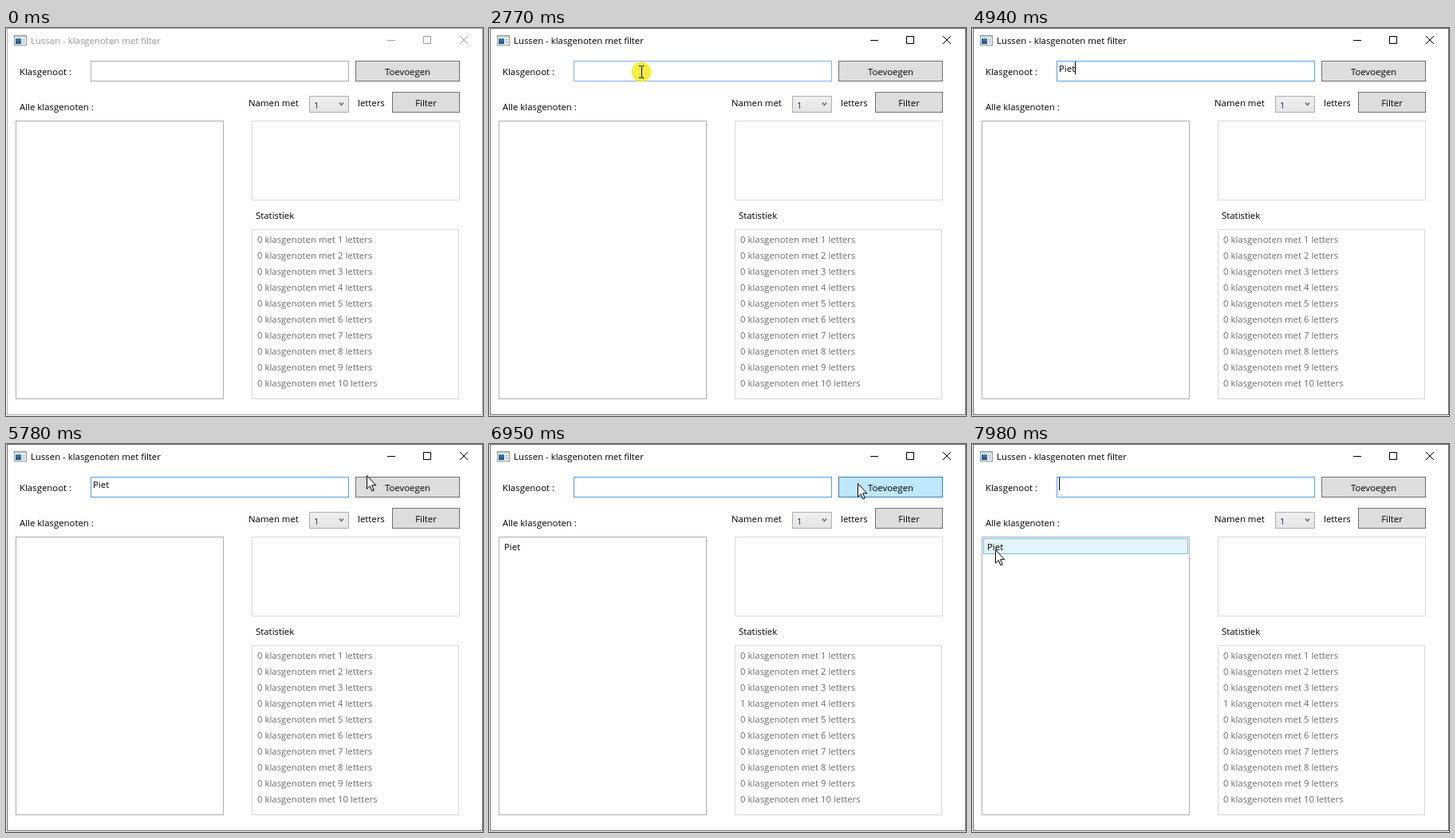
Write an HTML page that moves like this. It is 598 px wide and 486 px high and loops after 8000 ms.

```html
<!DOCTYPE html>
<html lang="nl">
<head>
<meta charset="utf-8">
<title>Lussen - klasgenoten met filter</title>
<style>
  html, body { margin: 0; width: 100%; height: 100%; overflow: hidden; background: #fff; }
  svg { display: block; width: 598px; height: 486px; }
  text { font: 11.4px "Open Sans", "Noto Sans", sans-serif; fill: #000; }
  .grey { fill: #6d6d6d; }
  .mid { text-anchor: middle; }
  rect { shape-rendering: crispEdges; }
</style>
</head>
<body>
<svg id="stage" viewBox="0 0 598 486" xmlns="http://www.w3.org/2000/svg">
  <defs>
    <linearGradient id="face" x2="0" y2="1">
      <stop stop-color="#f0f0f0"/><stop offset="1" stop-color="#e5e5e5"/>
    </linearGradient>
    <linearGradient id="pane" x2="0" y2="1">
      <stop stop-color="#3f7fae"/><stop offset="1" stop-color="#1f4f80"/>
    </linearGradient>
  </defs>
</svg>
<script>
const LOOP = 8000;
const NAME = 'Piet';
const stage = document.getElementById('stage');

function add(tag, attrs, content = '', parent = stage) {
  const el = document.createElementNS('http://www.w3.org/2000/svg', tag);
  for (const key in attrs) el.setAttribute(key, attrs[key]);
  el.textContent = content;
  return parent.appendChild(el);
}

// Outlined box given by its outer pixel edges
const box = (x0, y0, x1, y1, stroke, fill = '#fff') =>
  add('rect', { x: x0 + .5, y: y0 + .5, width: x1 - x0 - 1, height: y1 - y0 - 1, stroke, fill });
const label = (x, y, content, cls = '') => add('text', { x, y, class: cls }, content);
const show = (el, on) => el.setAttribute('visibility', on ? 'visible' : 'hidden');
const paint = (el, stroke, fill) => {
  el.setAttribute('stroke', stroke);
  el.setAttribute('fill', fill);
};
const place = (el, x, y) => el.setAttribute('transform', `translate(${x} ${y})`);

// Window frame and title bar
const frame = box(1, 0, 598, 485, '#aaa');
box(10, 9, 26, 22, '#8c959c', '#f4f6f8');
add('rect', { x: 11, y: 10, width: 14, height: 2, fill: '#c9d2d9' });
add('rect', { x: 12, y: 13, width: 7, height: 7, fill: 'url(#pane)' });
add('path', { d: 'M20 14.5h4M20 16.5h4M20 18.5h4', stroke: '#a9b6c0' });
const title = label(31, 20, 'Lussen - klasgenoten met filter');
const controls = add('path', {
  d: 'M478 15.5h10M523.5 10.5h9v9h-9zM569 10l10 10M579 10l-10 10', fill: 'none'
});

// Form
label(17, 59, 'Klasgenoot :');
const field = box(106, 41, 430, 67, '#abadb3');
const typed = label(109, 55, NAME);
const caret = add('rect', { y: 42, width: 1, height: 16, fill: '#000' });
const addButton = box(438, 41, 569, 67, '#707070', '#ddd');
label(503.5, 59, 'Toevoegen', 'mid');

label(17, 103, 'Alle klasgenoten :');
label(304, 98, 'Namen met');
box(380, 85, 430, 106, '#acacac', 'url(#face)');
add('text', { x: 386, y: 101, style: 'fill:#26375c' }, '1');
add('path', { d: 'M418 93.5l2.5 3 2.5-3', fill: 'none', stroke: '#606060', 'stroke-width': 1.3 });
label(441, 98, 'letters');
box(484, 80, 569, 106, '#707070', '#ddd');
label(526.5, 98, 'Filter', 'mid');

// Lists
box(12, 116, 273, 465, '#abadb3');
const row = box(14, 118, 271, 138, '#6ebfe6', '#e4f4fb');
const item = label(19, 133, NAME);
box(308, 116, 569, 216, '#d9d9d9');
label(313, 239, 'Statistiek');
box(308, 252, 568, 465, '#d9d9d9');
const stats = Array.from({ length: 10 }, (_, i) => label(315, 269 + 20 * i, '', 'grey'));

// Pointer
const glow = add('circle', { r: 12.5, fill: '#f3ea18', 'fill-opacity': .82 });
const beam = add('path', {
  d: 'M-3-7.5h2.5M3.5-7.5h-2.5M.5-7v14M-3 7.5h2.5M3.5 7.5h-2.5', stroke: '#000', fill: 'none'
});
const arrow = add('path', {
  d: 'M.5.5V17.2L4.3 13.6 6.9 20 9.3 19 6.7 12.7H11.8Z', fill: '#fff', stroke: '#000'
});

// Pointer moves: start, end, steps, from x, y, to x, y, easing
const linear = p => p;
const easeOut = p => 1 - (1 - p) ** 2;
const smooth = p => p * p * (3 - 2 * p);
const hop = (t, x, y) => [t, t, 1, x, y, x, y, linear];
const moves = [
  [1440, 1840, 6, 491, 392, 202, 46, easeOut],
  [1900, 2220, 5, 197, 42, 191, 54, linear],
  hop(2300, 191, 55),
  [5490, 5780, 5, 198, 54, 452, 39, linear],
  hop(5880, 462, 46),
  hop(6030, 464, 50),
  hop(6110, 464, 48),
  [6870, 7360, 7, 462, 49, 83, 118, smooth],
  [7420, 7570, 3, 62, 124, 29, 135, linear],
  hop(7740, 27, 133),
  hop(7830, 28, 134),
  hop(7980, 29, 132)
];
const keys = [4230, 4460, 4620, 4940];
const caretTimes = [[2840, 3370], [3830, 5490], [6030, 6260], [6420, 6950], [7420, 8000]];
const clicks = [[2770, 2910], [6260, 6420]];
const ADDED = 6420;

const within = (t, [a, b]) => t >= a && t < b;
const inside = (p, x0, y0, x1, y1) => p && p.x >= x0 && p.x < x1 && p.y >= y0 && p.y < y1;

function pointerAt(t) {
  const move = moves.filter(m => m[0] <= t).pop();
  if (!move) return null;
  const [t0, t1, steps, x0, y0, x1, y1, ease] = move;
  const last = steps - 1;
  const k = last ? Math.min(last, Math.floor((t - t0) / (t1 - t0) * last + 1e-6)) : 0;
  const p = last ? ease(k / last) : 1;
  return { x: Math.round(x0 + (x1 - x0) * p), y: Math.round(y0 + (y1 - y0) * p) };
}

function render(t) {
  const pointer = pointerAt(t);
  const active = t >= 2770;
  const pressed = within(t, clicks[1]);
  const focused = t >= 2840 && !pressed;
  const overField = inside(pointer, 106, 41, 430, 67);
  const overButton = inside(pointer, 438, 41, 569, 67);

  frame.setAttribute('stroke', active ? '#666' : '#aaa');
  title.style.fill = active ? '#000' : '#999';
  controls.setAttribute('stroke', active ? '#000' : '#999');

  field.setAttribute('stroke', focused ? '#569de5' : overField ? '#7eb4ea' : '#abadb3');
  if (pressed) paint(addButton, '#2c628b', '#c4e5f6');
  else if (overButton) paint(addButton, '#3c7fb1', '#bee6fd');
  else paint(addButton, '#707070', '#ddd');

  const text = t < ADDED ? NAME.slice(0, keys.filter(k => k <= t).length) : '';
  typed.textContent = text;
  caret.setAttribute('x', 109 + Math.round(text ? typed.getComputedTextLength() : 0));
  show(caret, caretTimes.some(span => within(t, span)));

  const added = t >= ADDED;
  show(item, added);
  show(row, added && inside(pointer, 14, 119, 271, 138));
  stats.forEach((line, i) => {
    const count = added && i + 1 === NAME.length ? 1 : 0;
    line.textContent = `${count} klasgenoten met ${i + 1} letters`;
  });

  const visible = pointer && !within(t, [4230, 5490]);
  show(beam, visible && overField);
  show(arrow, visible && !overField);
  show(glow, clicks.some(span => within(t, span)));
  if (pointer) [beam, arrow, glow].forEach(el => place(el, pointer.x, pointer.y));
}

let start;
function tick(now) {
  start ??= now;
  render((now - start) % LOOP);
  requestAnimationFrame(tick);
}
render(0);
requestAnimationFrame(tick);
</script>
</body>
</html>
```
